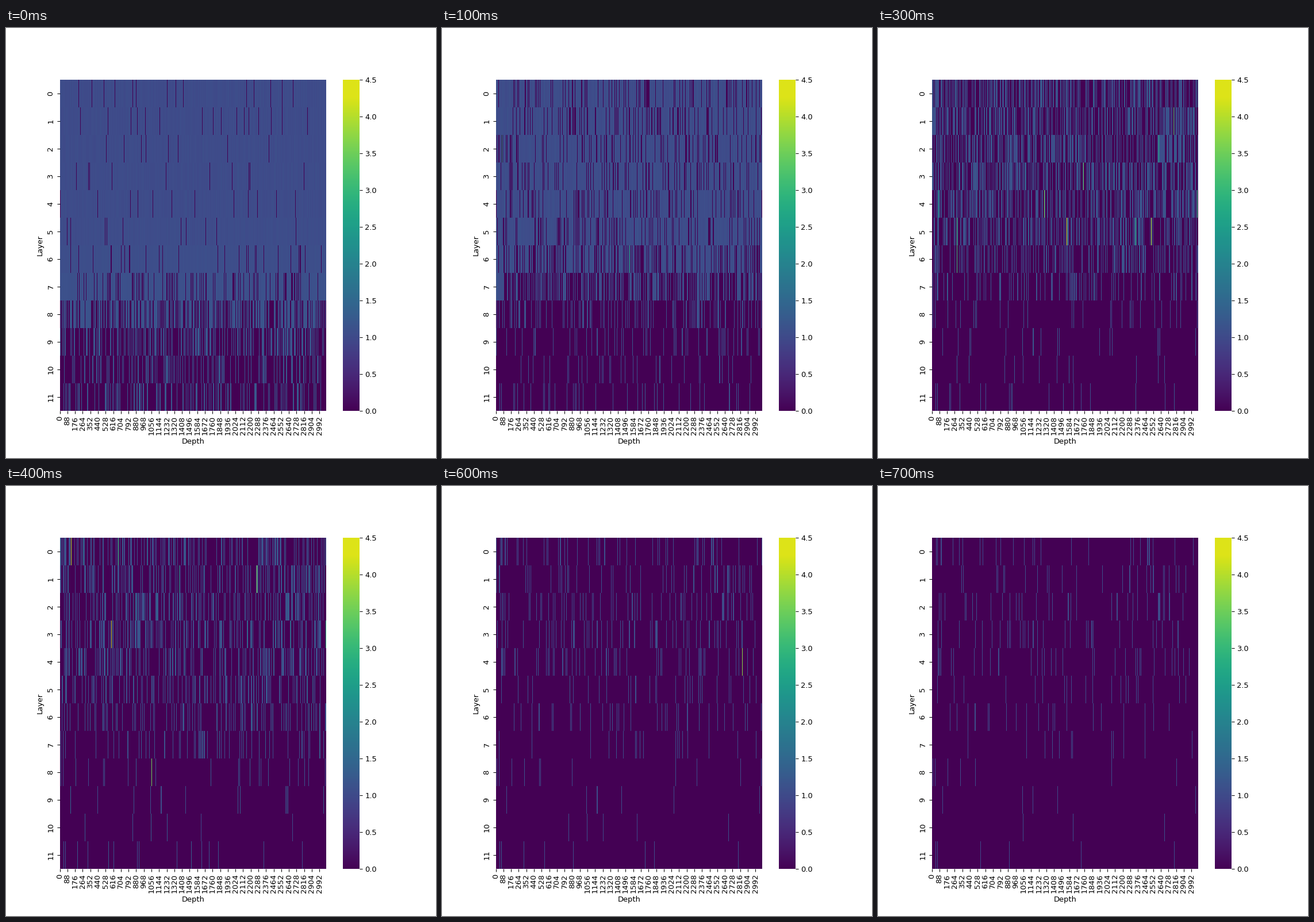
Animation of 748x748 px, one loop 0.8 s. Source, as a matplotlib script:

```python
import numpy as np
import matplotlib.pyplot as plt
from matplotlib.animation import FuncAnimation

SIZE, INCHES = 748, 8
FRAMES, INTERVAL = 8, 100
LAYERS, DEPTH = 12, 3072
VMAX = 4.5


def logistic(x):
    return 1 / (1 + np.exp(-x))


# A unit is live while its rank is below the live share of its layer.
ranks = np.random.default_rng(11).random((LAYERS, DEPTH))

# The last layers lose their units first.
handicap = 4.9 * logistic(1.1 * (np.arange(LAYERS) - 7.4))[:, None]


def live_share(frame):
    return logistic(3.6 - 1.95 * frame ** 0.6 - handicap * np.exp(-frame / 8))


def heat(frame):
    rng = np.random.default_rng(100 + frame)
    activity = np.sin(np.pi * frame / FRAMES) ** 2
    spread = 0.03 + 0.15 * activity
    values = 1 + 0.04 * handicap * np.exp(-frame)
    values = values + spread * np.abs(rng.standard_normal(ranks.shape))
    peaks = rng.random(ranks.shape) < 0.008 * activity
    values = np.where(peaks, rng.uniform(2.2, 4.2, ranks.shape), values)
    return np.where(ranks < live_share(frame), values, 0)


def add_mesh(bounds, x, y, values):
    axes = fig.add_axes(bounds)
    mesh = axes.pcolormesh(x, y, values, cmap="viridis", vmin=0, vmax=VMAX)
    axes.spines[:].set_visible(False)
    return axes, mesh


fig = plt.figure(figsize=(INCHES, INCHES), dpi=SIZE / INCHES, facecolor="white")

ax, heatmap = add_mesh([.125, .11, .62, .77], np.arange(DEPTH + 1),
                       np.arange(LAYERS + 1), heat(0))
ax.set(xlim=(0, DEPTH), ylim=(LAYERS, 0), xlabel="Depth", ylabel="Layer")
depths = np.arange(0, DEPTH - 44, 88)
layers = np.arange(LAYERS)
ax.set_xticks(depths + .5, depths, rotation="vertical")
ax.set_yticks(layers + .5, layers, rotation="vertical", va="center")

# The scale stays flat above its last full step.
edges = np.linspace(0, VMAX, 257)
shades = np.minimum(edges[:-1], 4.27)[:, None]
cax, _ = add_mesh([.78375, .11, .0385, .77], [0, 1], edges, shades)
cax.set_xticks([])
cax.yaxis.tick_right()
ticks = np.arange(0, VMAX + .1, .5)
cax.set_yticks(ticks, [f"{t:.1f}" for t in ticks])


def update(frame):
    heatmap.set_array(heat(frame))
    return heatmap,


animation = FuncAnimation(fig, update, frames=FRAMES, interval=INTERVAL,
                          repeat=True, repeat_delay=0)
plt.show()
```
